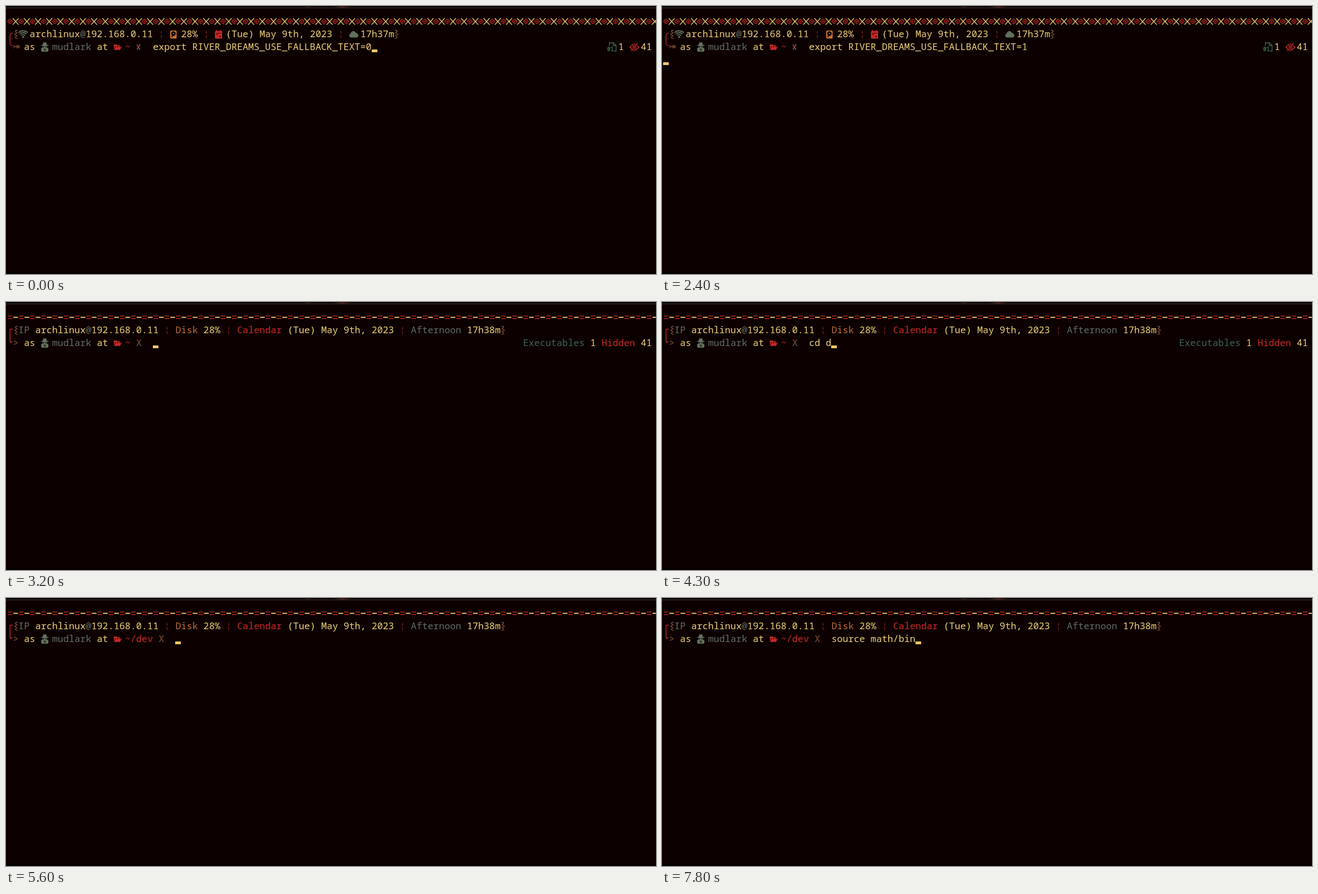
An HTML page with a canvas that plays this animation: 1164 px wide and 481 px high, repeating every 8000 ms.

```html
<!DOCTYPE html>
<html lang="en">
<head>
<meta charset="utf-8">
<title>Terminal prompt</title>
<style>
  html, body { margin: 0; width: 100%; height: 100%; overflow: hidden; background: #0c0000; }
  canvas { display: block; width: 1164px; height: 481px; }
</style>
</head>
<body>
<canvas id="stage" width="1164" height="481"></canvas>
<script>
const ctx = document.getElementById('stage').getContext('2d');
const W = 1164, H = 481, LOOP = 8000;
const CELL = 10.04, LEFT = 2.2, ROW = 23.2, TOP = 13.5, COLS = 116;
const USER = 'mudlark';
const C = {
  bg: '#0c0000', text: '#f3d078', cursor: '#f8c567', red: '#cb2a27', bar: '#8c2020',
  brown: '#87523d', orange: '#c66d38', grey: '#62705f', green: '#3f6754'
};

const colX = col => LEFT + col * CELL;
const rowY = row => Math.round(TOP + row * ROW);

function put(row, col, str, color = C.text) {
  ctx.font = '16.733px "Noto Sans Mono", monospace';
  ctx.fillStyle = color;
  ctx.fillText(str, colX(col), Math.round(TOP + row * ROW + 19));
}

// Draws in coordinates local to a cell's top left corner.
function at(row, col, color, draw) {
  ctx.save();
  ctx.translate(colX(col), rowY(row));
  ctx.fillStyle = ctx.strokeStyle = color;
  ctx.lineWidth = 1.4;
  draw();
  ctx.restore();
}

function line(...pts) {
  ctx.beginPath();
  for (let i = 0; i < pts.length; i += 2) ctx.lineTo(pts[i], pts[i + 1]);
  ctx.stroke();
}

function poly(...pts) {
  ctx.beginPath();
  for (let i = 0; i < pts.length; i += 2) ctx.lineTo(pts[i], pts[i + 1]);
  ctx.fill();
}

function disc(x, y, r, color) {
  if (color) ctx.fillStyle = color;
  ctx.beginPath();
  ctx.arc(x, y, r, 0, Math.PI * 2);
  ctx.fill();
}

function box(x, y, w, h, r = 0, color) {
  if (color) ctx.fillStyle = color;
  ctx.beginPath();
  ctx.roundRect(x, y, w, h, r);
  ctx.fill();
}

const icons = {
  wifi() {
    ctx.lineWidth = 2;
    for (const r of [4.8, 8.2, 11.6]) {
      ctx.beginPath();
      ctx.arc(8.4, 19, r, -Math.PI * 0.76, -Math.PI * 0.24);
      ctx.stroke();
    }
    disc(8.4, 18.4, 1.9);
  },
  disk() {
    box(0.6, 7, 11.6, 14.5, 1.5);
    disc(6.4, 12.4, 4, C.bg);
    disc(6.4, 12.4, 1.2, C.orange);
    ctx.strokeStyle = C.bg;
    ctx.lineWidth = 1.8;
    line(3, 19, 7, 14.5);
  },
  calendar() {
    box(0.5, 8, 12.8, 13.4, 1.5);
    box(2.5, 6.4, 2, 3);
    box(9.3, 6.4, 2, 3);
    box(2, 11.5, 9.8, 1, 0, C.bg);
    box(3.4, 13.8, 1.8, 1.8);
    box(8, 16.4, 2.5, 2.5);
  },
  cloud() {
    box(0, 12.8, 16.4, 6.6, 3.3);
    disc(7.3, 12.7, 4.6);
    disc(11.6, 14.2, 3.2);
  },
  spy() {
    poly(3.2, 10.2, 4.2, 5.3, 5.5, 5, 7, 5.8, 8.5, 5, 9.8, 5.3, 10.8, 10.2);
    box(0.8, 9.8, 12.4, 1.7, 0.8);
    box(3, 11, 8, 4.5, 2.5);
    box(0.5, 14.8, 13, 7.2, 2.5);
    box(3.7, 12.2, 2.6, 1.6, 0.7, C.bg);
    box(7.7, 12.2, 2.6, 1.6, 0.7);
    poly(5, 16, 7, 18, 6, 21);
    poly(9, 16, 7, 18, 8, 21);
  },
  folder() {
    poly(0.3, 9, 4.5, 9, 6, 10.5, 11, 10.5, 11, 12.4, 3, 12.4, 0.3, 17.5);
    poly(3.5, 13.2, 14, 13.2, 11.2, 18.8, 0.7, 18.8);
  },
  binary() {
    line(4, 11, 4, 6, 11.5, 6, 16, 10.5, 16, 21, 12, 21);
    line(11, 6.5, 11, 11, 15.5, 11);
    ctx.font = 'bold 10px "Noto Sans Mono", monospace';
    ctx.fillText('01', 0, 21);
  },
  eye() {
    ctx.lineWidth = 1.7;
    ctx.beginPath();
    ctx.moveTo(0.8, 14);
    ctx.quadraticCurveTo(8.5, 3.5, 16.4, 14);
    ctx.quadraticCurveTo(8.5, 24.5, 0.8, 14);
    ctx.stroke();
    disc(8.6, 14, 3.3);
    ctx.strokeStyle = C.bg;
    ctx.lineWidth = 3.4;
    line(3.2, 21, 14, 7);
    ctx.strokeStyle = C.red;
    ctx.lineWidth = 1.5;
    line(3.2, 20.5, 14, 7);
  },
  bar() {
    box(4.4, 8, 1.3, 4.8);
    box(4.4, 15.6, 1.3, 4.8);
  },
  arrow() {
    ctx.lineWidth = 1.2;
    line(0.8, 10.2, 3.6, 13, 0.8, 15.8);
    line(3.6, 13, 11.5, 13);
    line(6.5, 10.2, 9.2, 13, 6.5, 15.8);
    line(9.2, 10.2, 12, 13, 9.2, 15.8);
  },
  cross() {
    ctx.lineWidth = 1.7;
    line(1.2, 9, 7, 18.5);
    line(7.2, 8.5, 1.4, 18.5);
  },
  brace() {
    ctx.lineWidth = 1.3;
    ctx.lineJoin = 'round';
    line(8.5, 6.5, 5.2, 7, 4.6, 9, 7.6, 11.2, 3, 13.7, 7.6, 16.2, 4.6, 18.6, 5.2, 20.6, 8.5, 21.2);
  }
};

const icon = (row, col, name, color) => at(row, col, color, icons[name]);
const bars = (row, ...cols) => cols.forEach(col => icon(row, col, 'bar', C.bar));

function braces(row, end) {
  icon(row, 1, 'brace', C.brown);
  at(row, end, C.brown, () => {
    ctx.translate(CELL, 0);
    ctx.scale(-1, 1);
    icons.brace();
  });
}

function host(row, col) {
  put(row, col, 'archlinux');
  put(row, col + 9, '@', C.grey);
  put(row, col + 10, '192.168.0.11');
}

function bracket(row, radius) {
  at(row, 0, C.red, () => {
    const end = 11.6 + ROW;
    ctx.lineWidth = 1.3;
    ctx.beginPath();
    ctx.moveTo(10, 11.6);
    ctx.arcTo(5, 11.6, 5, 20, radius);
    ctx.arcTo(5, end, 10, end, radius);
    ctx.lineTo(10, end);
    ctx.stroke();
  });
}

function userAndDir(row, dir) {
  put(row, 3, 'as');
  icon(row, 6, 'spy', C.grey);
  put(row, 8, USER, C.grey);
  put(row, 16, 'at');
  icon(row, 19, 'folder', C.red);
  put(row, 21, dir, C.red);
}

function iconPrompt(row) {
  for (let col = 0; col < COLS; col += 2) {
    at(row, col, C.red, () => {
      ctx.lineWidth = 1.2;
      line(5, 9.3, 9.3, 13.6, 5, 17.9, 0.7, 13.6, 5, 9.3);
      disc(5, 13.6, 1.3);
    });
    at(row, col + 1, C.text, () => {
      line(-0.3, 8, 10.3, 19.6);
      line(10.3, 8, -0.3, 19.6);
    });
  }
  const info = row + 1, input = row + 2;
  bracket(info, 5);
  braces(info, 69);
  icon(info, 2, 'wifi', C.grey);
  host(info, 4);
  bars(info, 27, 35, 59);
  icon(info, 29, 'disk', C.orange);
  put(info, 31, '28%');
  icon(info, 37, 'calendar', C.red);
  put(info, 39, '(Tue) May 9th, 2023');
  icon(info, 61, 'cloud', C.grey);
  put(info, 63, '17h37m');

  icon(input, 1, 'arrow', C.brown);
  userAndDir(input, '~');
  icon(input, 23, 'cross', C.brown);
  icon(input, 107, 'binary', C.green);
  put(input, 109, '1');
  icon(input, 111, 'eye', C.red);
  put(input, 113, '41');
}

function textPrompt(row, dir) {
  for (let col = 0; col < COLS; col += 2) {
    at(row, col, C.red, () => {
      box(0.9, 10.5, 8.3, 1.4);
      box(0.9, 15, 8.3, 1.4);
    });
    at(row, col + 1, C.text, () => box(0.8, 12.6, 8.5, 1.9));
  }
  const info = row + 1, input = row + 2;
  bracket(info, 0);
  braces(info, 88);
  put(info, 2, 'IP', C.grey);
  host(info, 5);
  bars(info, 28, 39, 70);
  put(info, 30, 'Disk', C.orange);
  put(info, 35, '28%');
  put(info, 41, 'Calendar', C.red);
  put(info, 50, '(Tue) May 9th, 2023');
  put(info, 72, 'Afternoon', C.grey);
  put(info, 82, '17h38m');

  put(input, 1, '>', C.brown);
  userAndDir(input, dir);
  put(input, 22 + dir.length, 'X', C.brown);
  if (dir === '~') {
    put(input, 92, 'Executables', C.green);
    put(input, 104, '1');
    put(input, 106, 'Hidden', C.red);
    put(input, 113, '41');
  }
}

const EXPORT = 'export RIVER_DREAMS_USE_FALLBACK_TEXT=';
const screens = {
  icons: { draw: () => iconPrompt(0), row: 2, col: 26 },
  entered: { draw: () => { iconPrompt(0); put(2, 26, EXPORT + '1'); }, row: 3, col: 0 },
  switched: { draw: () => { screens.entered.draw(); textPrompt(3, '~'); }, row: 5, col: 26 },
  home: { draw: () => textPrompt(0, '~'), row: 2, col: 26 },
  moved: { draw: () => { textPrompt(0, '~'); put(2, 26, 'cd dev'); textPrompt(3, '~/dev'); }, row: 5, col: 30 },
  dev: { draw: () => textPrompt(0, '~/dev'), row: 2, col: 30 }
};

// Each step: start time, screen, typed text, cursor shown.
const steps = [
  [0, 'icons', EXPORT + '0', true],
  [500, 'icons', EXPORT + '0', false],
  [1000, 'icons', EXPORT + '0', true],
  [1500, 'icons', EXPORT + '0', false],
  [1700, 'icons', EXPORT, true],
  [2000, 'icons', EXPORT + '1', true],
  [2400, 'entered', '', true],
  [2500, 'switched', '', true],
  [3000, 'switched', '', false],
  [3100, 'switched', '', true],
  [3200, 'home', '', true],
  [3800, 'home', '', false]
];

function type(screen, text, times) {
  times.forEach((t, i) => steps.push([t, screen, text.slice(0, i + 1), true]));
}

type('home', 'cd dev', [4000, 4100, 4200, 4300, 4400, 4500]);
steps.push([5100, 'home', 'cd dev', false], [5200, 'moved', '', true], [5600, 'dev', '', true]);
type('dev', 'source math/bin', [5900, 6100, 6300, 6400, 6600, 6700, 6700,
  6900, 7000, 7100, 7200, 7400, 7500, 7700, 7800]);

function glow(x, y, r, color) {
  const g = ctx.createRadialGradient(x, y, 0, x, y, r);
  g.addColorStop(0, color);
  g.addColorStop(1, 'transparent');
  ctx.fillStyle = g;
  ctx.fillRect(x - r, 0, r * 2, 3);
}

function backdrop() {
  ctx.fillStyle = C.bg;
  ctx.fillRect(0, 0, W, H);
  ctx.fillStyle = '#080202';
  ctx.fillRect(0, 0, W, 3);
  glow(540, 2, 16, '#2a1210');
  glow(602, 1, 24, '#4a1d18');
  ctx.fillStyle = '#403835';
  ctx.fillRect(0, 3, W, 1);
  ctx.fillStyle = '#060101';
  ctx.fillRect(0, 478, W, 3);
}

function render(time) {
  const [, name, text, shown] = steps.findLast(step => step[0] <= time);
  const screen = screens[name];
  backdrop();
  screen.draw();
  put(screen.row, screen.col, text);
  if (shown) {
    ctx.fillStyle = C.cursor;
    const x = Math.round(colX(screen.col + text.length));
    ctx.fillRect(x, Math.round(TOP + screen.row * ROW + 18.1), 10, 5);
  }
}

const start = performance.now();
function tick() {
  render(Math.max(0, performance.now() - start) % LOOP);
  requestAnimationFrame(tick);
}
tick();
</script>
</body>
</html>
```
